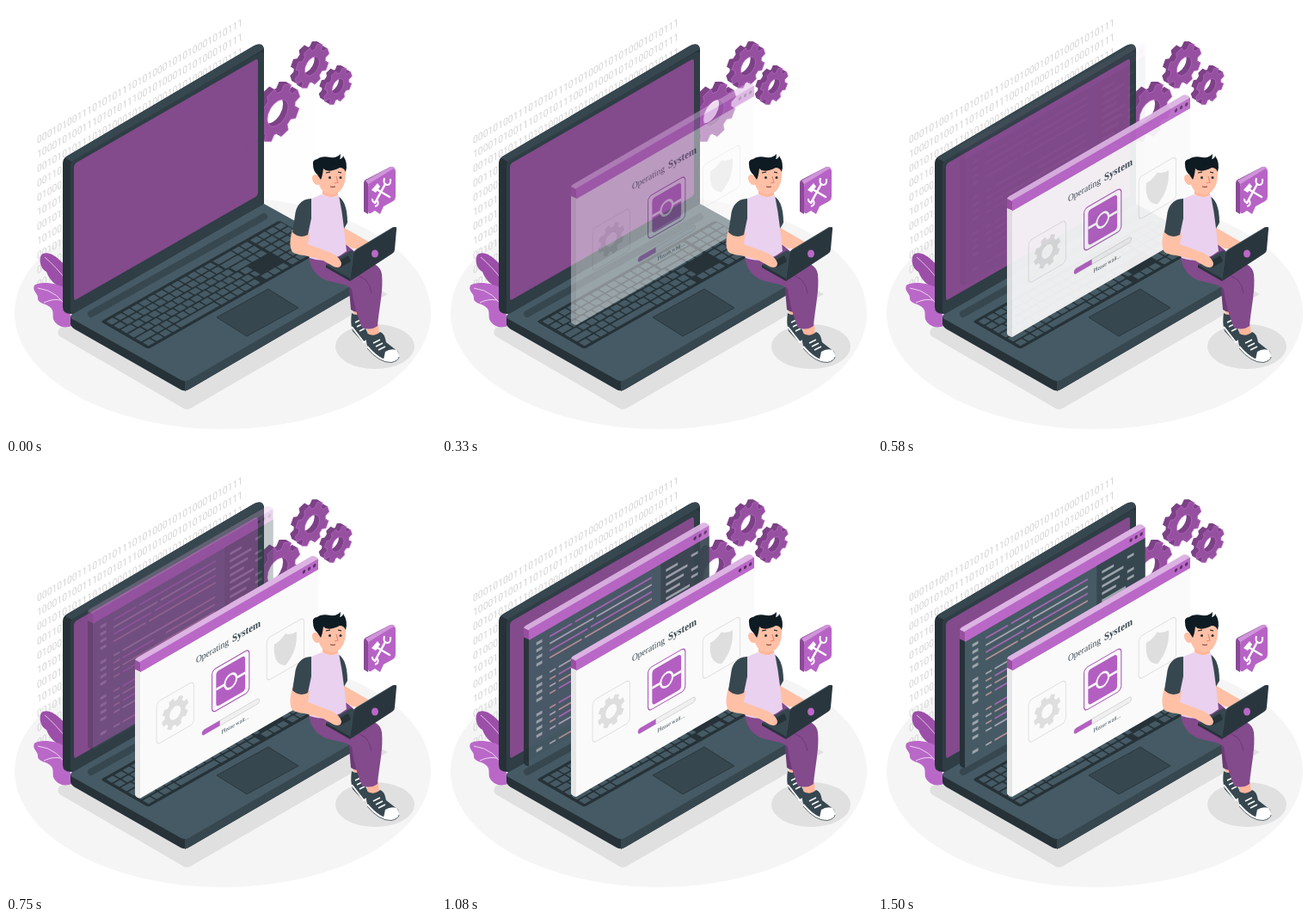
Recreate the animation shown at these times as an HTML page. Size 500 by 500 pixels, loop 1540 ms.

```html
<!DOCTYPE html>
<html lang="en">
<head>
<meta charset="utf-8">
<title>Operating system setup</title>
<style>
  html, body { margin: 0; width: 100%; height: 100%; overflow: hidden; background: #fff; }
  svg { display: block; width: 100vw; height: 100vh; }
  .serif { font-family: "Liberation Serif", serif; fill: #37474f; }
  .binary { font: 400 12px Roboto, sans-serif; fill: #d4d4d4; }
</style>
</head>
<body>
<svg viewBox="0 0 500 500">
  <ellipse cx="252" cy="357" rx="242" ry="135" fill="#f5f5f5"/>
  <path d="M62 375 Q58 381 64 385 L205 467 Q210 471 216 467 L444 335 L300 260Z" fill="#e0e0e0"/>
  <ellipse cx="429" cy="396" rx="46" ry="26" fill="#e0e0e0"/>
  <g id="binary" class="binary"></g>
  <g id="gears"></g>

  <g id="leaves">
    <path d="M72 332 C58 326 50 318 47 309 C38 304 38 290 43 288 C52 284 63 295 72 305Z" fill="#9c4fa8"/>
    <path d="M45 292 Q58 303 72 321" fill="none" stroke="#e3c3e8"/>
    <path d="M72 330 C60 321 38 320 33 325 C30 331 37 334 37 339 C36 346 47 346 51 350 C56 354 54 358 55 364 C58 371 66 376 76 372Z" fill="#ba68c8"/>
    <path d="M37 328 Q62 331 73 356 M44 345 Q54 340 64 342" fill="none" stroke="#ecd4f0"/>
  </g>

  <g id="laptop">
    <path d="M75 361 L75 370 Q76 374 82 377 L203 446 Q208 449 214 445 L430 319 L433 305Z" fill="#263238"/>
    <path d="M208 436 L208 448 L214 445 L430 319 L433 305Z" fill="#37474f"/>
    <path d="M77 358 L300 230 L428 301 Q436 306 428 310 L214 434 Q208 438 202 434 L79 365 Q72 362 77 358Z" fill="#455a64"/>
    <path d="M99 358 L300 245" stroke="#37474f" stroke-width="8" stroke-linecap="round"/>
    <g id="keyboard" transform="matrix(.866 -.49 .866 .5 110 367)"></g>
    <path d="M245 362 L305 329 L340 351 L280 384Z" fill="#37474f" stroke="#263238" stroke-width=".8"/>
    <path d="M66 183 Q66 177 71 174.500 L287 47 Q298 41 300 50 L300 230 L78 358 Q66 359 66 350Z" fill="#263238"/>
    <path d="M69 177 L71 174.500 L287 47 Q298 41 300 50 L78 182Z" fill="#37474f"/>
    <path d="M75 186 Q75 182 79 179 L293 55 Q300 51 300 58 L300 228 Q300 231 297 232 L79 357 Q75 359 75 354Z" fill="#2f3d45"/>
    <path d="M79 188 Q79 184 82 182 L289 63 Q293 60 293 65 L293 217 Q293 220 290 222 L82 341 Q79 343 79 339Z" fill="#834a8c"/>
  </g>

  <g id="editor"></g>
  <g id="installer"></g>

  <g id="bubble">
    <path d="M416 206 Q416 203 418 202 L447 187 L452 189 L421 208 L421 242 L416 239Z" fill="#8a4a95"/>
    <path d="M418 203 L447 187 Q452 186 452 190 L422 208Z" fill="#cf94d9"/>
    <path d="M421 210 Q421 207 423 206 L449 190 Q453 188 453 192 L453 222 Q453 225 450 227 L439 233 L435 242 L429 238 L424 241 Q421 242 421 238Z" fill="#b763c6"/>
    <path d="M429 212 L446 222 M429 229 L441 207" stroke="#fff" stroke-width="2.600" stroke-linecap="round"/>
    <path d="M425 214 L432 206 L435 210 L430 217Z" fill="#fff"/>
    <path d="M440 200 Q438 207 443 208 Q448 208 447 201 M426 224 Q426 229 430 228 M429 233 Q434 232 432 226" fill="none" stroke="#fff" stroke-width="2"/>
  </g>

  <g id="man">
    <path d="M403 350 L413 350 L415 364 L405 364Z" fill="#ffb69b"/>
    <path d="M402 357 Q407 361 412 357 L417 373 L424 387 Q420 393 414 390 L403 378 Q400 368 402 357Z" fill="#37474f"/>
    <path d="M402 373 L416 391 L422 388" fill="none" stroke="#fff" stroke-width="2"/>
    <path d="M406 368 l6 -3 M408 373 l6 -3 M411 378 l6 -3" stroke="#fff" stroke-width="1.4"/>
    <path d="M419 370 L433 370 L434 383 L421 385Z" fill="#ffb69b"/>
    <path d="M419 380 Q427 386 435 379 Q440 380 442 391 L456 402 Q459 410 450 413 Q440 414 432 407 L421 398 Q418 390 419 380Z" fill="#37474f"/>
    <path d="M441 402 Q447 398 454 400 Q459 406 456 410 Q449 416 439 411Z" fill="#fff"/>
    <path d="M420 396 Q434 413 447 413 Q455 412 456 407" fill="none" stroke="#fff" stroke-width="2.4"/>
    <path d="M420 398 Q434 415 448 414.500 Q456 413 457 408" fill="none" stroke="#37474f" stroke-width=".8"/>
    <path d="M427 392 l8 -4 M430 396 l8 -4 M433 400 l8 -4" stroke="#fff" stroke-width="1.6"/>
    <path d="M398 318 L401 353 Q407 358 413 354 L420 318Z" fill="#6c3a76"/>
    <path d="M352 288 C352 301 358 312 370 318 C381 323 396 322 402 329 C404 346 409 362 414 374 Q424 378 432 372 C434 350 439 330 437 312 C436 302 426 298 414 293 L394 276Z" fill="#834a8c"/>
    <path d="M379 307 Q405 309 418 318 Q424 325 425 334" fill="none" stroke="#6c3a76" stroke-width="1"/>
    <path d="M390 256 L423 275 Q426 281 418 283 L403 282 L389 274Z" fill="#ffc0a6"/>
    <path d="M385 221 C394 224 397 238 397 252 L393 259 L385 252Z" fill="#37474f"/>
    <path d="M353 225 L367 219 Q378 225 387 220 Q391 240 393 258 L396 285 Q376 301 353 293 Q347 267 349 246Z" fill="#e9d1ef"/>
    <path d="M368 209 L386 209 L386 220 Q377 225 368 219Z" fill="#ffb69b"/>
    <path d="M364 183 C360 201 363 217 377 219 C390 220 396 207 395 191 L391 183Z" fill="#ffc0a6"/>
    <path d="M364 198 C358 193 354 198 357 204 Q360 210 366 207Z" fill="#ffc0a6"/>
    <path d="M357 184 Q356 179 362 178 Q367 174 377 176 Q385 177 389 172 Q389 176 388 178 Q392 177 392 174 Q398 183 395 193 Q393 188 388 188 Q374 195 369 189 Q368 198 366 202 L362 196 Q357 192 357 184Z" fill="#0f1b22"/>
    <path d="M372 194 l5 -1 M386 193 l4 1" stroke="#0f1b22" stroke-width="1.2"/>
    <circle cx="376.500" cy="199.500" r="1.500" fill="#263238"/>
    <circle cx="389" cy="199.500" r="1.500" fill="#263238"/>
    <path d="M384 198 L386 205 L382 206" fill="none" stroke="#e58b73" stroke-width="1.2"/>
    <path d="M377 210 Q380 211 383 210" fill="none" stroke="#7e3b32"/>
    <path d="M372 301 L401 284 L428 297 L400 318Z" fill="#37474f"/>
    <path d="M372 301 L400 317 L400 320 L372 304Z" fill="#263238"/>
    <path d="M380 300 L398 290 L401 297 L389 304Z" fill="#263238"/>
    <path d="M402 300 L404 288 Q404 285 407 283 L450 257 L453 257 L406 286 L400 319Z" fill="#455a64"/>
    <path d="M404 289 Q404 286 407 284 L450 258 Q455 255 454 260 L452 283 Q452 286 449 288 L400 320Z" fill="#2a363d"/>
    <ellipse cx="429" cy="288" rx="4" ry="4.500" fill="#ba68c8"/>
    <path d="M333 260 Q328 279 333 286 Q337 289 347 290 L367 295 L381 303 Q390 306 390 299 Q388 292 378 287 L351 277 L353 264Z" fill="#ffc0a6"/>
    <path d="M355 224 C343 224 337 233 336 244 L333 263 Q341 271 351 266 L355 247Z" fill="#37474f"/>
  </g>
</svg>
<script>
const PURPLE = '#ba68c8', SLATE = '#37474f', PALE = '#dedede';
const el = id => document.getElementById(id);
const times = (n, fn) => Array.from({ length: n }, (_, i) => fn(i)).join('');
const iso = (x, y, body) => `<g transform="matrix(.866 -.5 0 1 ${x} ${y})">${body}</g>`;
const rect = (x, y, w, h, fill, more = '') =>
  `<rect x="${x}" y="${y}" width="${w}" height="${h}" fill="${fill}" ${more}/>`;
const circle = (x, y, r, fill, more = '') =>
  `<circle cx="${x}" cy="${y}" r="${r}" fill="${fill}" ${more}/>`;

function gearPath(r, hole) {
  const teeth = [[-15, .78], [-10, 1], [10, 1], [15, .78]];
  const points = [];
  for (let i = 0; i < 8; i++)
    for (const [turn, k] of teeth) {
      const a = (i * 45 + turn + 27) * Math.PI / 180;
      points.push((r * k * Math.cos(a)).toFixed(2) + ' ' + (r * k * Math.sin(a)).toFixed(2));
    }
  return `M${points.join('L')}ZM${hole} 0A${hole} ${hole} 0 1 0 ${-hole} 0A${hole} ${hole} 0 1 0 ${hole} 0Z`;
}
const gear = (r, hole, fill, more = '') =>
  `<path d="${gearPath(r, hole)}" fill="${fill}" fill-rule="evenodd" ${more}/>`;

function solidGear(x, y, r, hole) {
  const depth = 8;
  return times(depth, i => iso(x - 5 + i * .7, y - 3 + i * .4, gear(r, hole, '#7c4286')))
    + iso(x + 1, y + .5, gear(r, hole, '#95509f', `stroke="${PURPLE}" stroke-width=".7"`));
}

function binaryWall() {
  const starts = ['000101001110101011101', '100010100111010101110', '001010101110101000101', '001101010', '010001',
    '101010', '001010', '101001', '001010', '010001', '001010'];
  const tail = ['01000101010001010111', '01010001010100010111'];
  return starts.map((s, i) => iso(36, 160.500 + i * 16.8, `<text>${s + (i < 3 ? tail[i % 2] : '')}</text>`))
    .join('');
}

function keyboard() {
  const key = (x, y, w) => rect(x, y, w, 7.8, '#455a64', 'rx="1"');
  const block = (x, y, n) => times(n, i => key(x + i * 10.9, y, 9.2));
  return rect(0, 0, 240, 64, '#263238', 'rx="3"') + times(6, row => {
    const y = 3.500 + row * 9.8, lead = [9, 9, 13, 16, 20, 12][row];
    const main = row < 5
      ? key(4, y, lead) + block(6 + lead, y, 12) + key(138 + lead, y, 26 - lead)
      : block(4, y, 4) + key(47.600, y, 52) + block(101.500, y, 5);
    return main + (row < 3 || row > 4 ? block(162, y, 3) : '') + block(197, y, 4);
  });
}

// A window standing on the isometric plane; x, y is the top left of its front.
function panel(x, y, width, [face, side], body) {
  const right = x + width * .866, rise = width / 2;
  return `<path d="M${x - 6} ${y + 6}L${x - 6} ${y + 155}Q${x - 5} ${y + 158} ${x} ${y + 159}L${x + 1} ${y + 12}Z" fill="${side}"/>`
    + `<path d="M${x - 6} ${y - 2}L${x} ${y}L${x + 1} ${y + 12}L${x - 6} ${y + 9}Z" fill="#99509f"/>`
    + `<path d="M${x - 6} ${y - 2}Q${x - 5} ${y - 4} ${x - 3} ${y - 5}L${right - 8} ${y - rise - 3}Q${right - 2} ${y - rise - 4} ${right} ${y - rise + 1}L${x} ${y + 1}Z" fill="#dcb3e3"/>`
    + iso(x, y, rect(0, 12, width, 147, face) + rect(0, 0, width, 12.500, PURPLE)
      + times(3, i => circle(width - 19 + i * 7, 5.500, 2, '#5d3066')) + body);
}

function editorBody() {
  const bar = (x, y, w, fill) => rect(x, y - 1, w, 2, fill);
  const grey = '#a9a6b4', salmon = '#b58f93', violet = '#a765b5', mark = '#9ca4ab';
  const rows = times(16, i => {
    if (i % 5 === 4) return '';
    const y = 22 + i * 8.3, tone = [violet, grey, violet, salmon][i % 4];
    const split = 40 + i * 29 % 37;
    return rect(10, y - 2, 8, 3.500, mark) + (i < 4
      ? bar(28, y, split - 10, tone) + bar(split + 22, y, 143 - split, tone)
      : bar(28, y, 8, i % 2 ? grey : salmon) + bar(40, y, 40 + i * 17 % 50, tone) + bar(98, y, 66, salmon));
  });
  const side = times(11, i =>
    rect(184, 22 + i * 8.3, 16 + i * 13 % 18, 3, mark)
    + (i % 3 !== 1 ? rect(218, 22 + i * 8.3, 9, 3, mark) : ''));
  return rect(177, 12.500, 65, 146.500, SLATE) + rows + side;
}

function installerBody() {
  const card = (x, stroke, width) =>
    rect(x - 25, 58.500, 50, 49.500, 'none', `rx="5" stroke="${stroke}" stroke-width="${width}"`);
  const shield = 'M0 -18Q8 -12 15 -13Q17 10 0 19Q-17 10 -15 -13Q-8 -12 0 -18Z';
  return `<g class="serif"><text x="75" y="39.500" font-size="11">Operating</text>
    <text x="123.500" y="39.500" font-size="12.500" font-weight="700">System</text>
    <text x="109" y="139" font-size="7">Please wait...</text></g>`
    + card(47, PALE, 1) + card(121.500, '#a653b4', 1.200) + card(195, PALE, 1)
    + `<g transform="translate(47 83)">${gear(18, 7.500, PALE)}</g>`
    + `<path transform="translate(195 83)" d="${shield}" fill="${PALE}"/>`
    + rect(102, 63, 39, 41, '#b35fc2', 'rx="4"') + rect(102, 82, 39, 3, '#fafafa')
    + circle(121.500, 83.500, 8, '#b35fc2', 'stroke="#fafafa" stroke-width="2.500"')
    + rect(83, 122, 77, 6, '#f0f0f0', 'rx="3" stroke="#d0d0d0" stroke-width=".8"')
    + `<path d="M86 122H107V128H86A3 3 0 0 1 86 122Z" fill="#b35fc2"/>`;
}

el('binary').innerHTML = binaryWall();
el('gears').innerHTML = solidGear(315, 124, 30, 14) + solidGear(355, 69.500, 23, 10) + solidGear(385, 93, 19, 8);
el('keyboard').innerHTML = keyboard();
el('editor').innerHTML = panel(101, 194.500, 242, ['#455a64', '#263238'], editorBody());
el('installer').innerHTML = panel(156, 228, 239, ['#fafafa', '#e6e6e6'], installerBody());

// cubic-bezier(.36, -.01, .5, 1.38): slides past the end and settles back
function ease(x) {
  if (x <= 0) return 0;
  if (x >= 1) return 1;
  const curve = (t, a, b) => 3 * a * t * (1 - t) ** 2 + 3 * b * t * t * (1 - t) + t ** 3;
  let low = 0, high = 1;
  for (let i = 0; i < 24; i++) {
    const mid = (low + high) / 2;
    if (curve(mid, .36, .5) < x) low = mid; else high = mid;
  }
  return curve(low, -.01, 1.38);
}

function slideDown(id, seconds) {
  const p = ease(seconds);
  el(id).setAttribute('transform', `translate(0 ${(p - 1) * 30})`);
  el(id).setAttribute('opacity', Math.min(1, Math.max(0, p)));
}

const LOOP = 1540, LEAD = 35, EDITOR_DELAY = 500;
const start = performance.now();
function draw() {
  const time = (performance.now() - start) % LOOP + LEAD;
  slideDown('installer', time / 1000);
  slideDown('editor', (time - EDITOR_DELAY) / 1000);
  requestAnimationFrame(draw);
}
draw();
</script>
</body>
</html>
```
